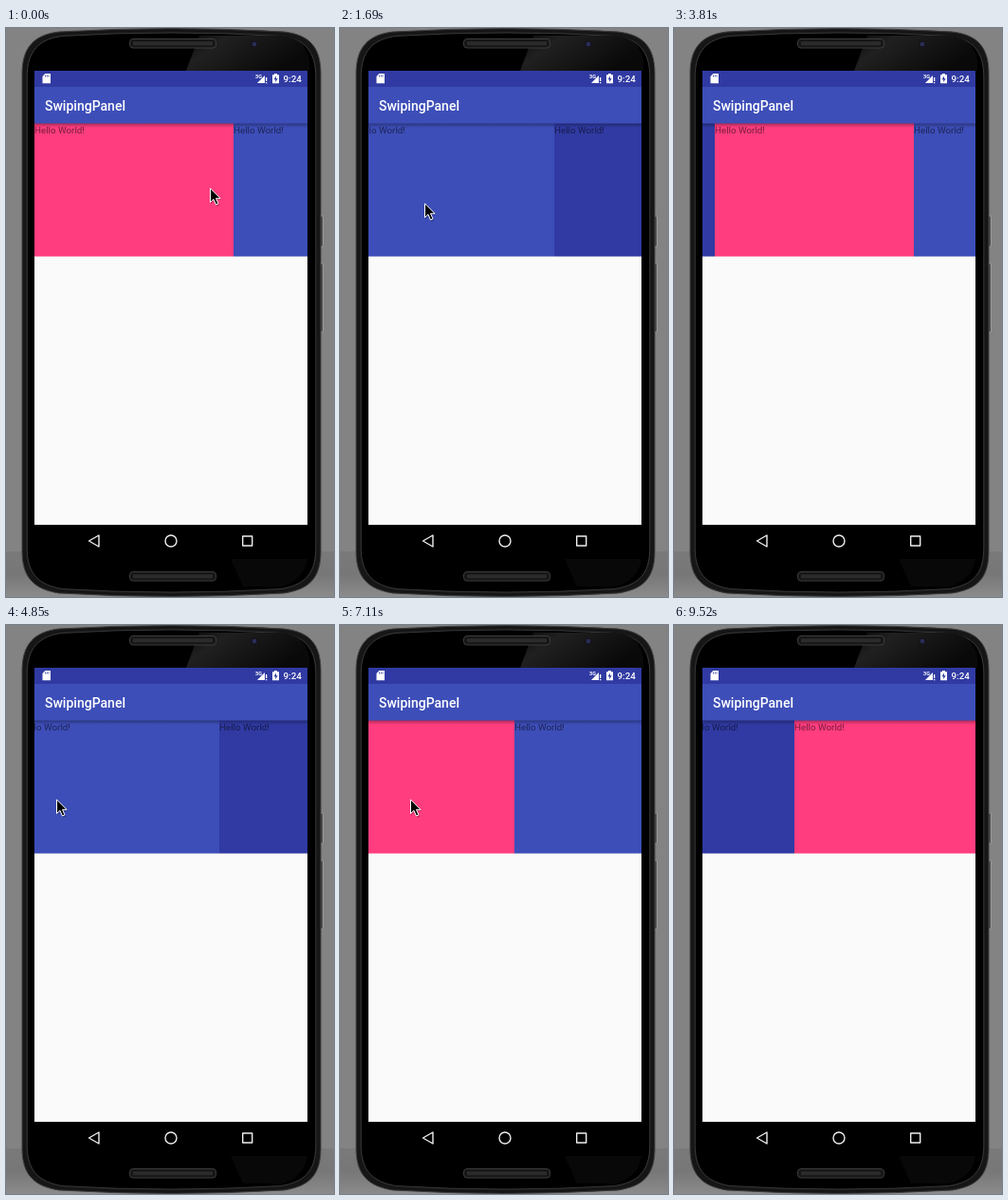
Write an HTML page that moves like this. It is 346 by 599 pixels and loops after 9.97 s.

```html
<!DOCTYPE html>
<html lang="en">
<head>
<meta charset="utf-8">
<title>Swiping panels</title>
<style>
html, body { margin: 0; width: 100%; height: 100%; overflow: hidden; background: #838383; }
svg { display: block; width: 346px; height: 599px; font-family: Roboto, sans-serif; }
.label { font-size: 9.8px; fill: #000; fill-opacity: .54; }
</style>
</head>
<body>
<svg viewBox="0 0 346 599">
  <defs>
    <linearGradient id="floor" x2="0" y2="1">
      <stop stop-color="#7a7a7a"/><stop offset=".5" stop-color="#777"/><stop offset="1" stop-color="#8b8b8b"/>
    </linearGradient>
    <linearGradient id="gloss" x2="1" y2=".4">
      <stop stop-color="#0b0b0b"/><stop offset=".3" stop-color="#202020"/><stop offset="1" stop-color="#090909"/>
    </linearGradient>
    <linearGradient id="shade" x2="0" y2="1">
      <stop stop-opacity=".34"/><stop offset="1" stop-opacity="0"/>
    </linearGradient>
    <clipPath id="view"><path d="M30 100H318V241H30z"/></clipPath>
    <path id="shell" d="M17 48C17 20 30 7 56 4Q174-3 293 4C320 7 332 20 332 48V551C332 579 320 591 293 595Q174 602 56 595C30 591 17 579 17 551z"/>
    <g id="speaker">
      <rect x="130.5" width="91" height="9.5" rx="3.5" fill="#161616" stroke="#3d3d3d"/>
      <path d="M134 4.8H218" stroke="#2b2b2b" stroke-width="4"/>
    </g>
  </defs>

  <path fill="#838383" d="M0 0H346V599H0z"/>
  <path fill="url(#floor)" d="M0 551H346V599H0z"/>
  <g fill="#4b4b4b" stroke="#b0b0b0" stroke-width=".7">
    <rect x="331" y="198" width="3.5" height="32" rx="1"/>
    <rect x="331" y="248" width="3.5" height="72" rx="1"/>
  </g>
  <use href="#shell" fill="#161616" stroke="#3f3f3f"/>
  <use href="#shell" fill="#000" stroke="#484848" stroke-width=".8" transform="translate(174.5 299.5) scale(.967 .985) translate(-174.5 -299.5)"/>
  <path d="M204 8H291Q315 10 320 34V45H190z" fill="url(#gloss)"/>
  <path d="M237 559H318Q315 581 291 588H250z" fill="#080808"/>
  <use href="#speaker" y="11.5"/>
  <use href="#speaker" y="572.5"/>
  <circle cx="262" cy="17" r="4" fill="#15151d"/>
  <circle cx="262" cy="17" r="2.3" fill="#2b2d58"/>

  <path fill="#fafafa" d="M30 45H318V523H30z"/>
  <g clip-path="url(#view)"><g id="strip"></g></g>
  <path fill="url(#shade)" d="M30 100H318V105H30z"/>
  <path fill="#303aa2" d="M30 45H318V62H30z"/>
  <path fill="#3d4eb8" d="M30 62H318V100.5H30z"/>
  <text x="41" y="87" font-size="14" font-weight="500" fill="#fff">SwipingPanel</text>

  <g fill="#fff">
    <path d="M41.3 48H47V58.300H38.500V51z"/>
    <path d="M41.500 49.500v2m1.800-2v2m1.800-2v2" stroke="#303aa2" stroke-width=".8"/>
    <text x="263" y="52.500" font-size="5.500" font-weight="700">3G</text>
    <path d="M265 58 273 50V58zm9-6h1.300v4H274zm0 5h1.300v1.200H274z"/>
    <path d="M283 48h3v1.200h2v9h-7v-9h2z"/>
    <path d="M285 50.500l-2.500 3.800h1.700V57l2.500-3.800H285z" fill="#303aa2"/>
    <text x="292.500" y="57" font-size="9.800" font-weight="500">9:24</text>
  </g>
  <g fill="none" stroke="#eee" stroke-width="1.400" stroke-linejoin="round">
    <path d="M87.500 540 98 534V546z"/>
    <circle cx="174" cy="540" r="6"/>
    <rect x="249.700" y="535" width="10" height="10"/>
  </g>
  <g id="cursor">
    <path d="M1 2V17.500L4.800 14 7.500 20 10.500 18.700 7.700 12.800H12.500z" opacity=".22"/>
    <path d="M.5 .8V15.500L4 12.300 6.500 18 9 16.900 6.500 11.300H11z" stroke="#fff"/>
  </g>
</svg>
<script>
const LOOP = 9970;
const kinds = [["#ff3d7f", 210], ["#3d4eb8", 210], ["#303aa2", 112]];
const PERIOD = 532; // width of one set of panels

// start, end, cursor x, cursor y, scroll (only while dragging)
const moves = [
  [120, 330, 161, 176, 54], [570, 800, 101, 175, 114],
  [980, 1150, 224, 174], [1330, 1690, 89, 184, 224],
  [1745, 2000, 153, 180], [2120, 2470, 91, 174, 286],
  [2525, 2620, 60, 176, 317], [2620, 2950, 208, 178],
  [3050, 3500, 6, 180, 519], [3500, 3750, 320, 172],
  [3750, 3800, 360, 168], [4090, 4220, 293, 162],
  [4390, 4900, 27, 185, 782], [4900, 5250, 136, 191],
  [5370, 5420, 74, 191], [5720, 6060, 200, 193, 656],
  [6115, 6220, 248, 192, 608], [6220, 6520, 21, 187],
  [6760, 6810, 54, 183], [7050, 7570, 227, 186, 435],
  [7870, 7930, 218, 183], [8590, 9515, 348, 595]
];

const strip = document.getElementById("strip");
const cursor = document.getElementById("cursor");

let left = 0;
for (let i = 0; i < 6; i++) {
  const [color, width] = kinds[i % 3];
  strip.innerHTML += `<rect x="${left}" y="100" width="${width}" height="140.5" fill="${color}"/>
    <text class="label" x="${left}" y="111">Hello World!</text>`;
  left += width;
}

function pose(t) {
  let x = 215, y = 168, scroll = 0;
  for (const [start, end, toX, toY, toScroll = scroll] of moves) {
    if (t < start) break;
    const p = Math.min(1, (t - start) / (end - start));
    x += (toX - x) * p;
    y += (toY - y) * p;
    scroll += (toScroll - scroll) * p;
  }
  return [x, y, scroll].map(Math.round);
}

function draw(now) {
  const [x, y, scroll] = pose(now % LOOP);
  strip.setAttribute("transform", `translate(${30 - scroll % PERIOD})`);
  cursor.setAttribute("transform", `translate(${x} ${y})`);
  requestAnimationFrame(draw);
}
draw(0);
</script>
</body>
</html>
```
